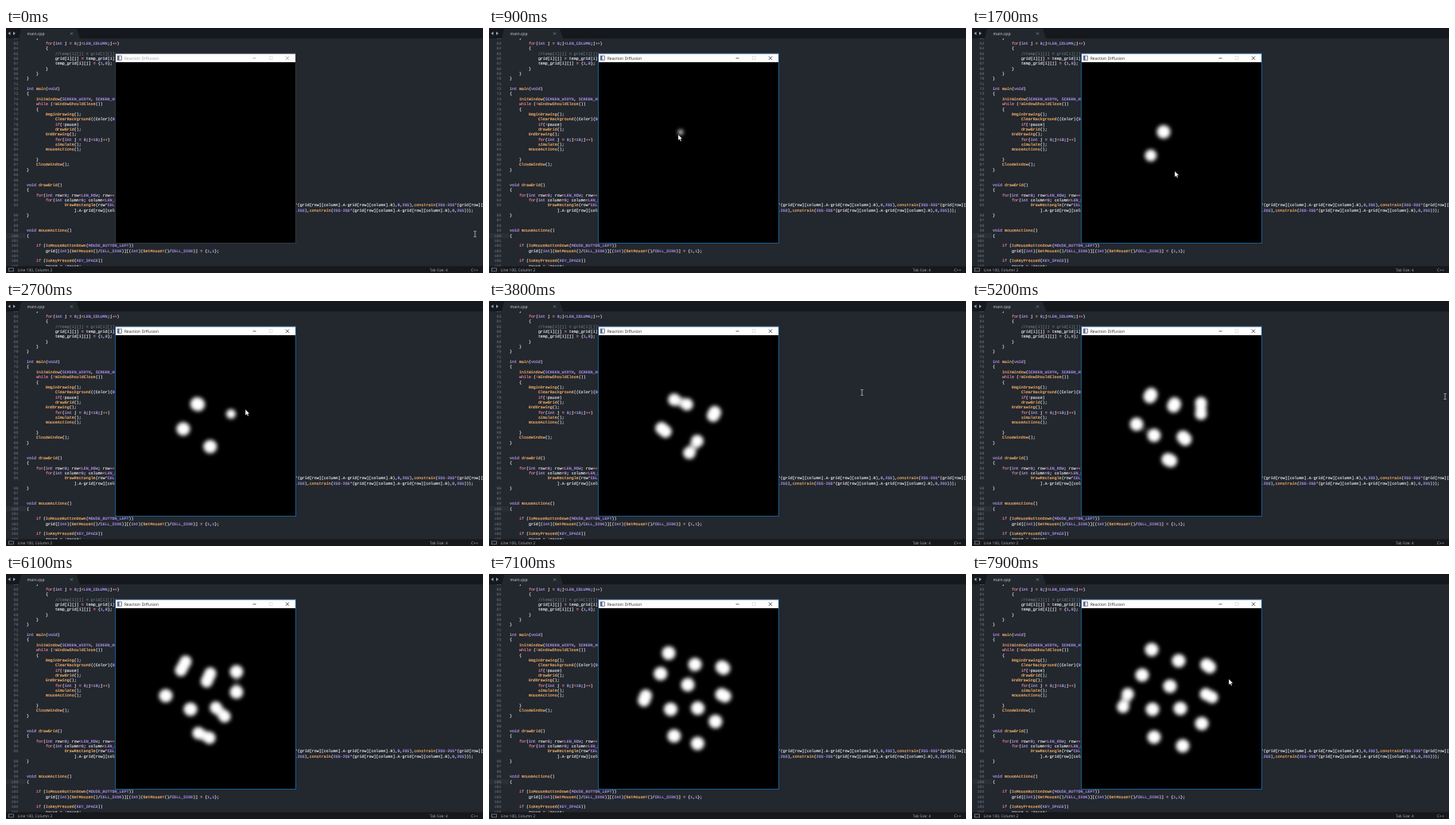
Recreate the animation shown at these times as an HTML page with a canvas. Size 600x308 px, loop 8000 ms.

```html
<!DOCTYPE html>
<html lang="en">
<head>
<meta charset="utf-8">
<title>Reaction Diffusion</title>
<style>
  html, body { margin: 0; width: 100%; height: 100%; overflow: hidden; background: #23272e; }
  svg, canvas { position: absolute; display: block; }
  svg { left: 0; top: 0; }
  #dish { left: 0; top: 0; filter: blur(2.4px); }
  #view { left: 138px; top: 43px; width: 226px; height: 227px; position: absolute; background: #000; overflow: hidden; }
  text { text-rendering: geometricPrecision; white-space: pre; }
  .code text { font: 4.983px "Liberation Mono", "DejaVu Sans Mono", monospace; stroke-width: .16px; }
  .ui { font: 5.1px "Open Sans", "Noto Sans", sans-serif; }
</style>
</head>
<body>
<svg width="600" height="308" viewBox="0 0 600 308">
  <rect width="600" height="308" fill="#23272e"/>
  <rect y="258" width="25" height="6.4" fill="#2a2f37"/>
  <g class="code" id="code"></g>
  <rect width="600" height="13" fill="#15181c"/>
  <path d="M16 13L19 1H89L93 13Z" fill="#23272e"/>
  <path d="M5.5 4.5V9L2.5 6.8ZM9 4.5V9L12 6.8Z" fill="#9aa0a8"/>
  <text class="ui" x="26.6" y="8.8" fill="#d5d8dc">main.cpp</text>
  <path d="M81 5.5l3 3m0-3l-3 3" stroke="#858b94" stroke-width=".7"/>
  <rect y="299.5" width="600" height="8.5" fill="#16181c"/>
  <rect x="3.5" y="302" width="6" height="3.8" fill="none" stroke="#8c929a" stroke-width=".7"/>
  <g class="ui" fill="#b4b8be">
    <text x="14.8" y="305.7" style="font-size:4.9px">Line 100, Column 2</text>
    <text x="533" y="305.7" style="font-size:4.7px">Tab Size: 4</text>
    <text x="585" y="305.7" style="font-size:4.9px">C++</text>
  </g>
  <rect id="frame" x="137.5" y="32" width="227" height="238.5" stroke-width="1"/>
  <rect x="138" y="32.5" width="226" height="10.7" fill="#fff"/>
  <rect x="140.2" y="35" width="5.2" height="5.2" fill="#f4f4fa" stroke="#34345c" stroke-width=".6"/>
  <rect x="140.4" y="35" width="2" height="5.2" fill="#5a5a90"/>
  <text class="ui" id="title" x="148.7" y="39.6">Reaction Diffusion</text>
  <path id="buttons" d="M310.5 38h4M351.8 35.6l4.4 4.4m0-4.4l-4.4 4.4" stroke-width=".7"/>
  <rect x="331.2" y="35.8" width="3.8" height="3.8" fill="none" stroke="#cfcfcf" stroke-width=".6"/>
</svg>
<div id="view"><canvas id="dish" width="226" height="227"></canvas></div>
<svg width="600" height="308" viewBox="0 0 600 308">
  <path id="arrow" d="M0-3V4.4L1.8 2.8L3 5.5L4.2 5L3 2.3H5.3Z" fill="#fff" stroke="#000" stroke-width=".3"/>
  <path id="beam" d="M-1.6-3.5h1.2l.4.4.4-.4h1.2M0-3.1V3.1M-1.6 3.5h1.2l.4-.4.4.4h1.2" fill="none" stroke="#d8dade" stroke-width=".7"/>
</svg>
<script>
const $ = id => document.getElementById(id);

// ---- editor text ----
const CHAR = 2.99, LEFT = 26, PITCH = 6.362, TOP = 20.8;
const source = `    }
        for(int j = 0;j<LEN_COLUMN;j++)
        {
            //temp[i][j] = grid[i][j];
            grid[i][j] = temp_grid[i][j];
            temp_grid[i][j] = {1,0};
        }
    }
}

int main(void)
{
    InitWindow(SCREEN_WIDTH, SCREEN_HEIGHT, "");
    while (!WindowShouldClose())
    {
        BeginDrawing();
            ClearBackground((Color){0,0,0,255});
            if(!pause)
            drawGrid();
        EndDrawing();
            for(int j = 0;j<10;j++)
            simulate();
        mouseActions();

    }
    CloseWindow();
}


void drawGrid()
{
    for(int row=0; row<LEN_ROW; row++)
        for(int column=0; column<LEN_COLUMN; column++)
                DrawRectangle(row*CELL_SIDE,column*CELL_SIDE, CELL_SIDE,CELL_SIDE,(Color){constrain((int)(255-255*(grid[row][column].A-grid[row][column].B),0,255),constrain(255-255*(grid[row][column
                    ].A-grid[row][column].B),0,255),constrain(255-255*(grid[row][column].A-grid[row][column].B),0,255),constrain(255-255*(grid[row][column].A-grid[row][column].B),0,255)));
}


void mouseActions()
{

    if (IsMouseButtonDown(MOUSE_BUTTON_LEFT))
        grid[(int)(GetMouseX()/CELL_SIDE)][(int)(GetMouseY()/CELL_SIDE)] = {1,1};

    if (IsKeyPressed(KEY_SPACE))
        pause = !pause;`.split("\n");
const WRAPPED = 34;

const keyword = /^(for|if|while|int|void)$/;
const styles = [
  [/^\/\//, "#646c78"],
  [/^(for|if|while)$/, "#e0809c"],
  [/^(int|void)$/, "#bd9cf0"],
  [/^[A-Z][A-Z_]+$/, "#ae94ee"],
  [/^\d/, "#a99cf0"],
  [/^[A-Za-z]\w*\($/, "#f2b06c"],
  [/^[*=<>+!-]/, "#e0809c"]
];
const colour = word => (styles.find(([re]) => re.test(word)) || [0, "#dde0e6"])[1];

function put(x, y, str, fill, anchor = "start") {
  const el = document.createElementNS("http://www.w3.org/2000/svg", "text");
  const attrs = { x, y, fill, stroke: fill, "text-anchor": anchor };
  for (const name in attrs) el.setAttribute(name, attrs[name]);
  el.textContent = str;
  $("code").append(el);
}

let lineNo = 62;
source.forEach((line, i) => {
  const y = TOP + (i - 1) * PITCH;
  if (i !== WRAPPED) put(15.5, y, lineNo++, "#59616c", "end");
  for (const m of line.matchAll(/\/\/.*|\w+|[*=<>+!-]+|[^\s\w*=<>+!-]+/g)) {
    const isCall = line[m.index + m[0].length] === "(" && !keyword.test(m[0]);
    put(LEFT + m.index * CHAR, y, m[0], colour(m[0] + (isCall ? "(" : "")));
  }
});

// ---- cells: path keys [seconds, x, y], then the two daughters ----
const cell = (path, ...kids) => ({ path, kids });
const seeds = [
  cell([[.8, 241, 131], [2.6, 241, 130]],
    cell([[3.8, 233, 124], [4.9, 225, 120]],
      cell([[6.1, 226, 110], [7.9, 226, 95]]),
      cell([[6.1, 220, 121], [7.9, 214, 127]])),
    cell([[3.8, 249, 130], [4.9, 254, 131]],
      cell([[6.1, 257, 125], [7.9, 260, 109]]),
      cell([[6.1, 252.5, 135], [7.9, 249, 141]]))),
  cell([[1.1, 226, 160], [3.2, 222, 161]],
    cell([[3.8, 217, 160], [5.2, 207, 155], [6.1, 201, 153], [6.8, 198, 154]],
      cell([[7.9, 196, 151]]),
      cell([[7.9, 190, 167]])),
    cell([[3.8, 222, 164], [5.2, 229, 169], [6.1, 232, 170], [7.9, 227, 170]])),
  cell([[1.75, 255, 183], [2.8, 257, 183]],
    cell([[3.8, 262, 176], [4.9, 266, 172]],
      cell([[6.1, 264, 168], [7.9, 262, 169]]),
      cell([[6.1, 275, 179], [7.9, 289, 188]])),
    cell([[3.8, 252, 191], [4.9, 248, 199]],
      cell([[6.1, 242, 200], [7.9, 229, 205]]),
      cell([[6.1, 256, 206], [7.9, 265, 216]]))),
  cell([[2.3, 283, 142], [3.4, 283, 142]],
    cell([[3.8, 284, 140], [5.2, 288, 128], [6.6, 291, 120]],
      cell([[7.9, 295, 114]]),
      cell([[7.9, 299, 117]])),
    cell([[3.8, 282, 144], [5.2, 288, 142], [6.6, 291, 152]],
      cell([[7.9, 294, 151]]),
      cell([[7.9, 302, 155]])))
];

// each daughter starts where its mother ended
function inherit(c) {
  for (const kid of c.kids) {
    kid.path.unshift(c.path[c.path.length - 1]);
    inherit(kid);
  }
}
seeds.forEach(inherit);

const clamp = v => Math.max(0, Math.min(1, v));
const slowing = u => 1 - (1 - u) ** 1.5;

function along(path, t, easeLast) {
  const n = path.length - 1;
  let i = 0;
  while (i < n - 1 && t >= path[i + 1][0]) i++;
  const [a, b] = [path[i], path[i + 1]];
  let u = clamp((t - a[0]) / (b[0] - a[0]));
  if (easeLast && i === n - 1) u = slowing(u);
  return [a[1] + (b[1] - a[1]) * u, a[2] + (b[2] - a[2]) * u];
}

const ctx = $("dish").getContext("2d");
ctx.lineCap = "round";
const RADIUS = 8.6, SQUEEZE = 1.2;

const isWhole = (c, t) => !c.kids.length || t < c.path[c.path.length - 1][0];
const place = (c, t) => along(c.path, t, !c.kids.length);

function drawCell(c, t, r) {
  if (isWhole(c, t)) {
    ctx.fillStyle = "#fff";
    ctx.beginPath();
    ctx.arc(...place(c, t), r, 0, 2 * Math.PI);
    ctx.fill();
    return;
  }
  const lobe = c.kids.every(k => isWhole(k, t)) ? drawBridge(c.kids, t) : RADIUS;
  c.kids.forEach(k => drawCell(k, t, lobe));
}

// joins two parting lobes and returns their radius, narrower while they pull apart
function drawBridge(pair, t) {
  const [p, q] = pair.map(k => place(k, t));
  const gap = Math.hypot(p[0] - q[0], p[1] - q[1]);
  const s = clamp((28 - gap) / 16);
  const r = RADIUS - SQUEEZE * s * clamp(gap / 8);
  const v = Math.round(255 * s);
  ctx.strokeStyle = `rgb(${v},${v},${v})`;
  ctx.lineWidth = 6 + (2 * r - 6) * s;
  ctx.beginPath();
  ctx.moveTo(...p);
  ctx.lineTo(...q);
  ctx.stroke();
  return r;
}

function drawDish(t) {
  ctx.setTransform(1, 0, 0, 1, 0, 0);
  ctx.globalCompositeOperation = "source-over";
  ctx.fillStyle = "#000";
  ctx.fillRect(0, 0, 226, 227);
  ctx.globalCompositeOperation = "lighten";
  ctx.translate(-138, -43);
  for (const s of seeds) {
    const age = t - s.path[0][0];
    if (age > 0) drawCell(s, t, RADIUS * Math.sqrt(clamp(age / .8)));
  }
}

// ---- pointer and window focus ----
const pointer = [
  [0, 590, 259], [.3, 590, 259], [.75, 241, 131], [.85, 241, 131], [1.1, 226, 160],
  [1.25, 226, 160], [1.65, 255, 183], [1.9, 255, 183], [2.3, 283, 142], [2.6, 283, 142],
  [3.6, 462, 116], [3.8, 469, 115], [4.5, 584, 118], [5.2, 595, 120], [5.5, 612, 121],
  [7.2, 612, 150], [7.8, 323, 135], [8, 323, 135]
];

function drawPointer(t) {
  const [x, y] = along(pointer, t);
  const inside = x > 138 && x < 365 && y > 32 && y < 270;
  for (const id of ["arrow", "beam"]) {
    $(id).setAttribute("transform", `translate(${x} ${y})`);
    $(id).style.display = (id === "arrow") === inside ? "" : "none";
  }
}

function setFocus(on) {
  $("frame").setAttribute("stroke", on ? "#1c5c8c" : "#34363c");
  $("title").setAttribute("fill", on ? "#222" : "#a0a0a8");
  $("buttons").setAttribute("stroke", on ? "#222" : "#8a8a8a");
}

function tick() {
  const t = performance.now() % 8000 / 1000;
  drawDish(t);
  drawPointer(t);
  setFocus(t >= .8);
  requestAnimationFrame(tick);
}
tick();
</script>
</body>
</html>
```
